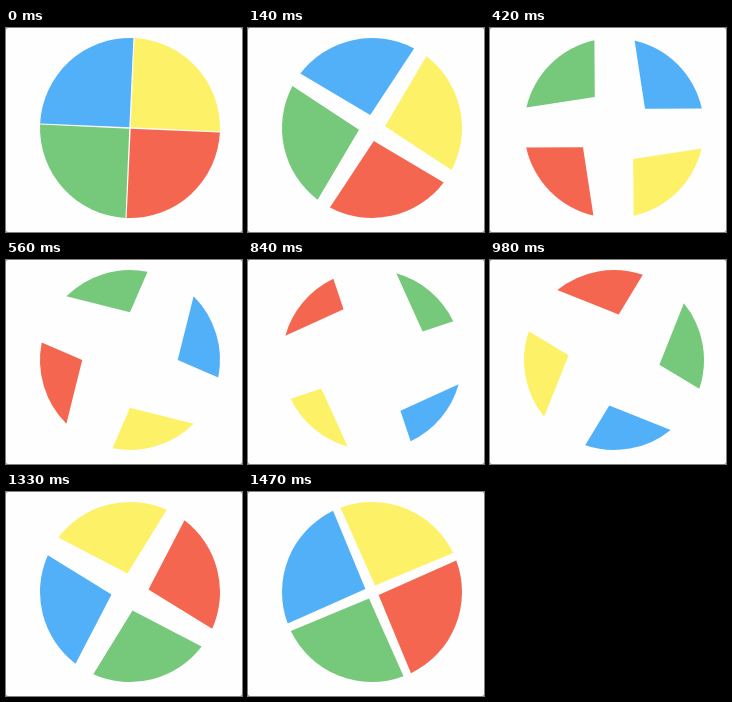
An HTML page that plays this animation: 236 by 204 pixels, repeating every 1540 ms.

```html
<!DOCTYPE html>
<html lang="en">
<head>
<meta charset="utf-8">
<title>Pie spinner</title>
<style>
  html, body { margin: 0; width: 100%; height: 100%; overflow: hidden; background: #8a8a8a; }
  svg { display: block; width: 236px; height: 204px; border-radius: 2px; background: #fefefe; }
</style>
</head>
<body>
<svg viewBox="0 0 236 204">
  <defs><path id="slice"/></defs>
  <g transform="translate(124 100)">
    <g id="wheel">
      <use href="#slice" fill="#76c87a"/>
      <use href="#slice" fill="#51b0f8" transform="rotate(90)"/>
      <use href="#slice" fill="#fdf168" transform="rotate(180)"/>
      <use href="#slice" fill="#f4664f" transform="rotate(270)"/>
    </g>
  </g>
</svg>
<script>
const LOOP = 1540, STEP = 70, R = 90;
const slice = document.getElementById('slice');
const wheel = document.getElementById('wheel');

// [time, half turns]: nearly even speed with a slight wobble
const turns = [[0, .016], [280, .397], [560, .75], [840, 1.087],
               [980, 1.283], [1190, 1.528], [1470, 1.886]];

function turnAt(t) {
  let i = 1;
  while (i < turns.length - 1 && t > turns[i][0]) i++;
  const [t0, a] = turns[i - 1], [t1, b] = turns[i];
  return a + (b - a) * (t - t0) / (t1 - t0);
}

// The tip slides outward and one rim point closes in; the other rim point stays.
function slicePath(open) {
  const k = R * Math.SQRT1_2;
  const end = Math.PI / 4 * (1 - open);
  return `M${k * open} 0L${k} ${-k}A${R} ${R} 0 0 1 ${R * Math.cos(end)} ${R * Math.sin(end)}Z`;
}

function draw(now) {
  const t = Math.floor(now % LOOP / STEP) * STEP;
  const p = turnAt(t);
  slice.setAttribute('d', slicePath(1 - Math.abs(1 - p)));
  wheel.setAttribute('transform', `rotate(${135 + 180 * p})`);
}

const start = performance.now();
function tick() {
  draw(performance.now() - start);
  requestAnimationFrame(tick);
}
tick();
</script>
</body>
</html>
```
